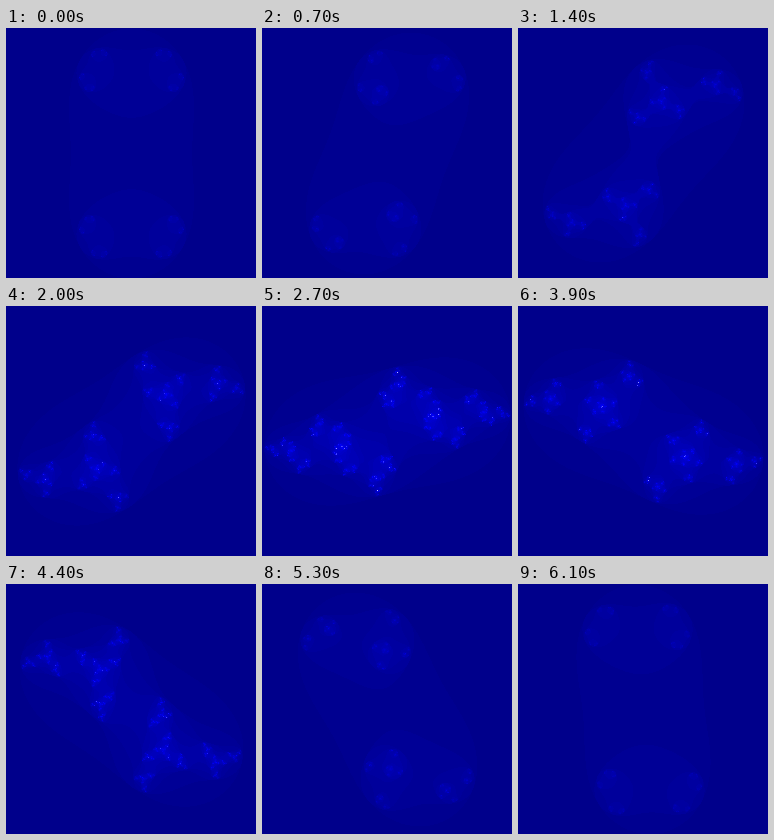
An HTML page with a canvas for the animation above (6200 ms loop, 250 by 250 pixels).

```html
<!DOCTYPE html>
<html>
<head>
<meta charset="utf-8">
<title>Julia sets of z² + e^(ia)</title>
<style>
  html, body { margin: 0; width: 100%; height: 100%; overflow: hidden; background: #00008b; }
  canvas { display: block; width: 250px; height: 250px; }
</style>
</head>
<body>
<canvas id="stage" width="250" height="250"></canvas>
<script>
const SIZE = 250, STEPS = 62, STEP_MS = 100, MAX_ITER = 100;
const RADIUS = (1 + Math.sqrt(5)) / 2; // escape radius for |c| = 1

// Colour stops: [share of MAX_ITER, r, g, b]
const STOPS = [
  [0, 0, 0, 139], [0.22, 0, 0, 255], [0.4, 255, 255, 255],
  [0.6, 255, 150, 0], [0.8, 225, 30, 0], [1, 0, 0, 0]
];

function colorAt(share) {
  const i = Math.max(1, STOPS.findIndex(stop => stop[0] >= share));
  const [from, to] = [STOPS[i - 1], STOPS[i]];
  const mix = (share - from[0]) / (to[0] - from[0]);
  return [1, 2, 3].map(k => Math.round(from[k] + (to[k] - from[k]) * mix));
}

const palette = Array.from({ length: MAX_ITER + 1 },
  (_, n) => colorAt(Math.max(0, n - 1) / (MAX_ITER - 1)));

function escapeCount(x, y, cx, cy) {
  let n = 0;
  while (n < MAX_ITER && x * x + y * y <= RADIUS * RADIUS) {
    [x, y] = [x * x - y * y + cx, 2 * x * y + cy];
    n++;
  }
  return n;
}

const ctx = document.getElementById('stage').getContext('2d');
const image = ctx.createImageData(SIZE, SIZE);

function draw(angle) {
  const cx = Math.cos(angle), cy = Math.sin(angle);
  const unit = 2 * RADIUS / SIZE;
  for (let j = 0, p = 0; j < SIZE; j++) {
    for (let i = 0; i < SIZE; i++, p += 4) {
      const n = escapeCount(i * unit - RADIUS, j * unit - RADIUS, cx, cy);
      image.data.set(palette[n], p);
      image.data[p + 3] = 255;
    }
  }
  ctx.putImageData(image, 0, 0);
}

let shown = -1;
function tick() {
  const step = Math.floor(performance.now() / STEP_MS) % STEPS;
  if (step !== shown) draw((shown = step) / 10);
  requestAnimationFrame(tick);
}
tick();
</script>
</body>
</html>
```
